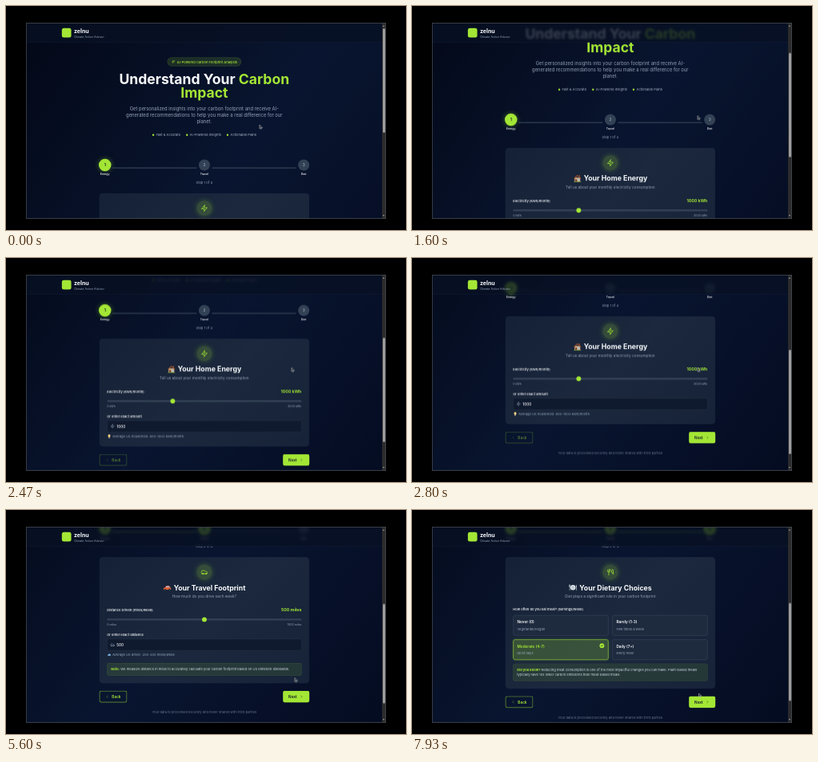
An HTML page that plays this animation: 500x281 px, repeating every 8 s.

```html
<!DOCTYPE html>
<html lang="en">
<head>
<meta charset="utf-8">
<title>Carbon footprint wizard</title>
<style>
:root { --lime: #a3e635; --mute: #94a3b8; --line: #334155; }
* { box-sizing: border-box; margin: 0; padding: 0; }
html, body { width: 100%; height: 100%; overflow: hidden; background: #000; }
body { font-family: Inter, sans-serif; color: #f8fafc; }
#stage { position: relative; width: 500px; height: 281px; overflow: hidden; background: #000; }
#win { position: absolute; left: 25px; top: 21px; width: 450px; height: 246px; overflow: hidden; background: #040a1b; }
#edge { position: absolute; inset: 0; box-shadow: inset 0 0 0 .7px #4a4d54; }
#view { position: absolute; left: 0; top: .5px; width: 1521px; height: 840px; transform: scale(.29297); transform-origin: 0 0; overflow: hidden; }
#page { position: absolute; left: 0; top: 0; width: 1521px; height: 1580px; background: linear-gradient(125deg, #030817, #091530 50%, #040b20); }
#main { position: absolute; left: 312.5px; top: 0; width: 896px; }
#page, #thumb, #cursor, #tail, #next, #back, .step, .count span, .dot, .bar i, #arrow, #hand { animation: 8s linear infinite; }
svg { display: block; fill: none; stroke: currentColor; stroke-width: 2; stroke-linecap: round; stroke-linejoin: round; }

header { position: absolute; left: 0; top: 0; width: 1521px; height: 81px; background: rgba(8,17,36,.8); backdrop-filter: blur(6px); border-bottom: 1px solid #1c2942; }
.logo { position: absolute; left: 152.5px; top: 20px; width: 40px; height: 40px; border-radius: 8px; background: var(--lime); }
.brand { position: absolute; left: 204.5px; top: 16px; font: 700 24px/32px Inter, sans-serif; }
.brand small { display: block; font: 400 12px/16px Inter, sans-serif; color: var(--mute); }

.mid { position: absolute; left: 0; width: 100%; text-align: center; white-space: nowrap; }
.badge { top: 145px; }
.badge span { display: inline-flex; align-items: center; gap: 8px; height: 38px; padding: 0 16px; border: 1px solid rgba(163,230,53,.3); border-radius: 19px; background: rgba(163,230,53,.14); color: var(--lime); font: 500 14px/20px Inter, sans-serif; }
h1 { top: 207px; font: 700 60px/60px Inter, sans-serif; }
h1 b, .val, .note b { color: var(--lime); }
.lead { top: 351px; font-size: 20px; line-height: 28px; color: var(--mute); }
.perks { top: 467px; display: flex; justify-content: center; gap: 24px; font-size: 14px; line-height: 20px; color: #a5b1c3; }
.perks span::before { content: ""; display: inline-block; width: 8px; height: 8px; margin-right: 8px; border-radius: 50%; background: var(--lime); vertical-align: 1px; }

.dot { position: absolute; top: 582px; width: 48px; height: 48px; border-radius: 50%; background: var(--line); color: var(--mute); font: 600 16px/48px Inter, sans-serif; text-align: center; }
.cap { position: absolute; top: 638px; width: 48px; text-align: center; font: 500 12px/16px Inter, sans-serif; }
.bar { position: absolute; top: 616px; width: 360px; height: 4px; border-radius: 2px; background: var(--line); overflow: hidden; }
.bar i { display: block; height: 4px; background: var(--lime); transform-origin: 0 0; }
.count { top: 672px; height: 20px; font-size: 14px; line-height: 20px; color: var(--mute); }
.count span { position: absolute; left: 0; width: 100%; animation-timing-function: step-end; }

.step { position: absolute; top: 726px; left: 0; width: 896px; padding: 32px; border: 1px solid #26344c; border-radius: 16px; background: linear-gradient(135deg, #152136, #1b283d 50%, #162338); }
.orb { width: 64px; height: 64px; margin: 0 auto 16px; padding: 16px; border-radius: 50%; background: rgba(163,230,53,.2); box-shadow: 0 0 20px rgba(163,230,53,.3); color: var(--lime); }
h2 { display: flex; justify-content: center; gap: 9px; font: 700 30px/36px Inter, sans-serif; white-space: nowrap; }
h2 svg { width: 37px; height: 36px; stroke: none; }
.sub { margin: 8px 0 32px; text-align: center; font-size: 16px; line-height: 24px; color: var(--mute); }
.row { display: flex; justify-content: space-between; align-items: center; height: 28px; font: 500 14px/20px Inter, sans-serif; }
.val { font-size: 18px; font-weight: 700; }
.track { position: relative; height: 8px; margin-top: 23px; border-radius: 4px; background: var(--line); }
.track i { position: absolute; top: -6px; width: 20px; height: 20px; margin-left: -10px; border-radius: 50%; background: var(--lime); }
.ends { display: flex; justify-content: space-between; margin: 9px 0 26px; font-size: 12px; line-height: 16px; color: var(--mute); }
.lab { font: 500 14px/20px Inter, sans-serif; }
.field { position: relative; height: 50px; margin: 8px 0 9px; padding-left: 40px; border: 1px solid var(--line); border-radius: 8px; background: #101a2e; font: 500 16px/48px Inter, sans-serif; }
.field svg { position: absolute; left: 12px; top: 14px; width: 20px; height: 20px; color: var(--mute); }
.hint { display: flex; gap: 5px; font-size: 14px; line-height: 20px; color: var(--mute); white-space: nowrap; }
.hint svg { width: 18px; height: 18px; stroke: none; }
.note { padding: 16px; border: 1px solid rgba(163,230,53,.25); border-radius: 8px; background: rgba(163,230,53,.1); font-size: 14px; line-height: 20px; color: #cbd5e1; white-space: nowrap; }
.grid { display: grid; grid-template-columns: 407px 407px; gap: 16px; margin: 16px 0; }
.opt { position: relative; height: 88px; padding: 15px 16px; border: 2px solid #3a485d; border-radius: 8px; background: #1e2a3e; font: 600 16px/24px Inter, sans-serif; }
.opt small { display: block; margin-top: 8px; font: 400 14px/20px Inter, sans-serif; color: var(--mute); }
.opt.on { border-color: var(--lime); background: rgba(163,230,53,.22); color: var(--lime); box-shadow: 0 0 14px rgba(163,230,53,.2); }
.opt svg { position: absolute; right: 16px; top: 15px; width: 20px; height: 20px; padding: 4px; border-radius: 50%; background: var(--lime); color: #0f172a; stroke-width: 4; }

#tail { position: absolute; top: 1221px; left: 0; width: 100%; animation-name: drop; animation-timing-function: step-end; }
.btn { position: absolute; top: 0; height: 50px; display: flex; align-items: center; justify-content: center; gap: 12px; border-radius: 8px; font: 600 16px/24px Inter, sans-serif; }
.btn svg { width: 16px; height: 16px; }
#back { left: 0; width: 118px; border: 2px solid var(--lime); color: var(--lime); animation-name: enable; }
#next { right: 0; width: 113px; background: var(--lime); color: #0f172a; animation-name: hover; }
.priv { top: 82px; font-size: 14px; line-height: 20px; color: #64748b; }
footer { position: absolute; left: -312.5px; top: 166px; width: 1521px; height: 140px; padding-top: 32px; border-top: 1px solid #1b2840; background: rgba(4,9,24,.4); text-align: center; font-size: 14px; line-height: 20px; color: var(--mute); }

#rail { position: absolute; left: 445px; top: 0; width: 5px; height: 246px; background: #2b2b2d; }
#rail::before, #rail::after { content: ""; position: absolute; left: 1.2px; border: 1.3px solid transparent; }
#rail::before { top: 2px; border-bottom: 2px solid #a0a0a0; }
#rail::after { bottom: 2px; border-top: 2px solid #a0a0a0; }
#thumb { position: absolute; left: 1px; width: 3px; top: 7px; border-radius: 1.5px; background: #9c9c9e; animation-name: thumb; }
#cursor { position: absolute; left: 0; top: 0; width: 6px; height: 7px; animation-name: point; }
#cursor svg { position: absolute; left: 0; top: 0; width: 6px; height: 7px; stroke: #e5e7eb; stroke-width: .5; fill: #111; animation-timing-function: step-end; }
#arrow { animation-name: arrow; }
#cursor #hand { fill: #f1f5f9; stroke: #1e293b; animation-name: hand; }

#page { animation-name: scroll; }
@keyframes scroll {
  0%, 12.5% { transform: none; }
  20% { transform: translateY(-194px); }
  24.125% { transform: translateY(-299px); }
  35% { transform: translateY(-552px); animation-timing-function: ease-out; }
  38.5%, 100% { transform: translateY(-600px); }
}
@keyframes thumb {
  0%, 12.5% { transform: none; height: 131px; }
  20% { transform: translateY(30.6px); }
  24.125% { transform: translateY(47.1px); }
  35% { transform: translateY(87px); animation-timing-function: ease-out; }
  38.5%, 61.62% { transform: translateY(94.6px); height: 131px; }
  61.63%, 94.62% { transform: translateY(89.6px); height: 125px; }
  94.63%, 100% { transform: translateY(88.5px); height: 123px; }
}
@keyframes point {
  0%, .9% { transform: translate(316.5px, 149px); animation-timing-function: ease-in-out; }
  5%, 45% { transform: translate(356.5px, 137.5px); animation-timing-function: ease-in-out; }
  51%, 73.4% { transform: translate(360.5px, 210.5px); animation-timing-function: ease-in-out; }
  83%, 100% { transform: translate(358px, 229.5px); }
}
@keyframes arrow { 0% { opacity: 1; } 50% { opacity: 0; } 61.63% { opacity: 1; } 81% { opacity: 0; } 94.63%, 100% { opacity: 1; } }
@keyframes hand { 0% { opacity: 0; } 50% { opacity: 1; } 61.63% { opacity: 0; } 81% { opacity: 1; } 94.63%, 100% { opacity: 0; } }
@keyframes hover {
  0%, 49.5% { background: #a3e635; } 51.5%, 61.62% { background: #84cc16; }
  63.5%, 80.5% { background: #a3e635; } 82.4%, 94.62% { background: #84cc16; } 96.5%, 100% { background: #a3e635; }
}
@keyframes enable { 0%, 57.5% { opacity: .5; } 61%, 100% { opacity: 1; } }
@keyframes drop { 0% { transform: none; } 61.63% { transform: translateY(78px); } 94.63%, 100% { transform: translateY(101px); } }
@keyframes s1 { 0%, 57.5% { opacity: 1; transform: none; } 61.62%, 100% { opacity: 0; transform: translateX(-20px); } }
@keyframes s2 {
  0%, 61.62% { opacity: 0; transform: translateX(20px); } 65.6%, 90.6% { opacity: 1; transform: none; }
  94.62%, 100% { opacity: 0; transform: translateX(-20px); }
}
@keyframes s3 { 0%, 94.62% { opacity: 0; transform: translateX(20px); } 98.5%, 100% { opacity: 1; transform: none; } }
@keyframes n1 { 0% { opacity: 1; } 57.5%, 100% { opacity: 0; } }
@keyframes n2 { 0% { opacity: 0; } 57.5% { opacity: 1; } 90.6%, 100% { opacity: 0; } }
@keyframes n3 { 0% { opacity: 0; } 90.6%, 100% { opacity: 1; } }
.lit { background: var(--lime); color: #0f172a; box-shadow: 0 0 20px rgba(163,230,53,.4); }
@keyframes d1 { 0%, 57.5% { transform: scale(1.1); } 61.2%, 100% { transform: none; } }
@keyframes d2 {
  0%, 57.5% { background: #334155; color: #94a3b8; transform: none; box-shadow: 0 0 20px transparent; }
  61.2%, 90.6% { background: #a3e635; color: #0f172a; transform: scale(1.1); box-shadow: 0 0 20px rgba(163,230,53,.4); }
  94.3%, 100% { background: #a3e635; color: #0f172a; transform: none; box-shadow: 0 0 20px rgba(163,230,53,.4); }
}
@keyframes d3 {
  0%, 90.6% { background: #334155; color: #94a3b8; transform: none; box-shadow: 0 0 20px transparent; }
  94.3%, 100% { background: #a3e635; color: #0f172a; transform: scale(1.1); box-shadow: 0 0 20px rgba(163,230,53,.4); }
}
@keyframes b1 { 0%, 57.5% { transform: scaleX(0); } 61.2%, 100% { transform: none; } }
@keyframes b2 { 0%, 90.6% { transform: scaleX(0); } 94.3%, 100% { transform: none; } }
</style>
</head>
<body>
<svg width="0" height="0" style="position:absolute">
  <symbol id="zap" viewBox="0 0 24 24"><path d="M13 2 3 14h9l-1 8 10-12h-9z"/></symbol>
  <symbol id="car" viewBox="0 0 24 24"><path d="M19 17h2c.6 0 1-.4 1-1v-3c0-.9-.7-1.7-1.5-1.9C18.7 10.6 16 10 16 10s-1.3-1.4-2.2-2.3c-.5-.4-1.1-.7-1.8-.7H5c-.6 0-1.1.4-1.4.9l-1.4 2.9A3.7 3.7 0 0 0 2 12v4c0 .6.4 1 1 1h2M9 17h6"/><circle cx="7" cy="17" r="2"/><circle cx="17" cy="17" r="2"/></symbol>
  <symbol id="fork" viewBox="0 0 24 24"><path d="M3 2v7c0 1.1.9 2 2 2h4a2 2 0 0 0 2-2V2M7 2v20M21 15V2a5 5 0 0 0-5 5v6c0 1.1.9 2 2 2h3zv7"/></symbol>
  <symbol id="star" viewBox="0 0 24 24"><path d="M11 4l2 6 6 2-6 2-2 6-2-6-6-2 6-2zM20 2v4M18 4h4"/></symbol>
  <symbol id="left" viewBox="0 0 24 24"><path d="m15 18-6-6 6-6"/></symbol>
  <symbol id="right" viewBox="0 0 24 24"><path d="m9 18 6-6-6-6"/></symbol>
  <symbol id="tick" viewBox="0 0 24 24"><path d="M4 12l6 6L20 6"/></symbol>
  <symbol id="house" viewBox="0 0 36 36"><path fill="#d9b38c" d="M6 15h24v18H6z"/><path fill="#a0522d" d="M18 3 2 18l3 2L18 8l13 12 3-2zM25 4h4v8l-4-4z"/><path fill="#6b3a22" d="M9 22h7v11H9z"/><path fill="#8ec5ea" d="M20 20h7v7h-7z"/><path fill="#5c913b" d="M2 31h32v3H2z"/></symbol>
  <symbol id="auto" viewBox="0 0 36 36"><path fill="currentColor" d="M2 20l7-3 5-7h12l6 8 2 3v6H2z"/><path fill="#9fd3f5" d="M12 17l4-5h4v5zM22 12h3l4 5h-7z"/><g fill="#30363d"><circle cx="9" cy="27" r="4"/><circle cx="27" cy="27" r="4"/></g></symbol>
  <symbol id="plate" viewBox="0 0 36 36"><circle cx="18" cy="18" r="11" fill="#e1e8ed"/><circle cx="18" cy="18" r="7" fill="#bcc8d2"/><path fill="#cbd5de" d="M2 5h1v7h1V5h1v7h1V5h1v9l-2 2v15H3V16l-2-2V5zM31 5q4 3 3 13h-1v13h-2z"/></symbol>
  <symbol id="bulb" viewBox="0 0 36 36"><path fill="#ffd983" d="M18 2a11 11 0 0 1 7 19l-2 6H13l-2-6A11 11 0 0 1 18 2z"/><path fill="#99aab5" d="M13 28h10v4l-3 3h-4l-3-3z"/></symbol>
</svg>
<div id="stage">
  <div id="win">
    <div id="view">
      <div id="page"><div id="main">
        <div class="mid badge"><span><svg width="16" height="16"><use href="#star"/></svg>AI-Powered Carbon Footprint Analysis</span></div>
        <h1 class="mid">Understand Your <b>Carbon<br>Impact</b></h1>
        <p class="mid lead">Get personalized insights into your carbon footprint and receive AI-<br>generated recommendations to help you make a real difference for our<br>planet.</p>
        <div class="mid perks"><span>Fast &amp; Accurate</span><span>AI-Powered Insights</span><span>Actionable Plans</span></div>

        <div class="bar" style="left:56px"><i style="animation-name:b1"></i></div>
        <div class="bar" style="left:480px"><i style="animation-name:b2"></i></div>
        <div class="dot lit" style="left:0;animation-name:d1">1</div>
        <div class="dot" style="left:424px;animation-name:d2">2</div>
        <div class="dot" style="left:848px;animation-name:d3">3</div>
        <div class="cap" style="left:0">Energy</div>
        <div class="cap" style="left:424px">Travel</div>
        <div class="cap" style="left:848px">Diet</div>
        <div class="mid count">
          <span style="animation-name:n1">Step 1 of 4</span><span style="animation-name:n2">Step 2 of 4</span><span style="animation-name:n3">Step 3 of 4</span>
        </div>

        <section class="step" style="height:463px;animation-name:s1">
          <svg class="orb"><use href="#zap"/></svg>
          <h2><svg><use href="#house"/></svg>Your Home Energy</h2>
          <p class="sub">Tell us about your monthly electricity consumption</p>
          <div class="row"><span>Electricity (kWh/month)</span><span class="val">1000 kWh</span></div>
          <div class="track"><i style="left:280px"></i></div>
          <div class="ends"><span>0 kWh</span><span>3000 kWh</span></div>
          <div class="lab">Or enter exact amount</div>
          <div class="field"><svg><use href="#zap"/></svg>1000</div>
          <div class="hint"><svg><use href="#bulb"/></svg>Average US household: 800-1000 kWh/month</div>
        </section>

        <section class="step" style="height:541px;animation-name:s2">
          <svg class="orb"><use href="#car"/></svg>
          <h2><svg style="color:#e0603a"><use href="#auto"/></svg>Your Travel Footprint</h2>
          <p class="sub">How much do you drive each week?</p>
          <div class="row"><span>Distance Driven (miles/week)</span><span class="val">500 miles</span></div>
          <div class="track"><i style="left:415px"></i></div>
          <div class="ends"><span>0 miles</span><span>1000 miles</span></div>
          <div class="lab">Or enter exact distance</div>
          <div class="field"><svg><use href="#car"/></svg>500</div>
          <div class="hint"><svg style="color:#6b9fd0"><use href="#auto"/></svg>Average US driver: 200-300 miles/week</div>
          <div class="note" style="margin-top:24px"><b>Note:</b> We measure distance in miles to accurately calculate your carbon footprint based on US emission standards.</div>
        </section>

        <section class="step" style="height:564px;animation-name:s3">
          <svg class="orb"><use href="#fork"/></svg>
          <h2><svg><use href="#plate"/></svg>Your Dietary Choices</h2>
          <p class="sub">Diet plays a significant role in your carbon footprint</p>
          <div class="lab">How often do you eat meat? (servings/week)</div>
          <div class="grid">
            <div class="opt">Never (0)<small>Vegetarian/Vegan</small></div>
            <div class="opt">Rarely (1-3)<small>Few times a week</small></div>
            <div class="opt on">Moderate (4-7)<small>Most days</small><svg><use href="#tick"/></svg></div>
            <div class="opt">Daily (7+)<small>Every meal</small></div>
          </div>
          <div class="note"><b>Did you know?</b> Reducing meat consumption is one of the most impactful changes you can make. Plant-based meals<br>typically have 10x lower carbon emissions than meat-based meals.</div>
        </section>

        <div id="tail">
          <div class="btn" id="back"><svg><use href="#left"/></svg>Back</div>
          <div class="btn" id="next">Next<svg><use href="#right"/></svg></div>
          <p class="mid priv">Your data is processed securely and never shared with third parties</p>
          <footer>Built for Orbelquartz DevAI Buildathon 2025</footer>
        </div>
      </div></div>
      <header><div class="logo"></div><div class="brand">zelnu<small>Climate Action Advisor</small></div></header>
    </div>
    <div id="rail"><div id="thumb"></div></div>
    <div id="edge"></div>
  </div>
  <div id="cursor">
    <svg id="arrow" viewBox="0 0 6 7"><path d="M.5.5v4.2l1-.9.7 1.6.7-.3-.7-1.5h1.3z"/></svg>
    <svg id="hand" viewBox="0 0 6 7"><path d="M1.5.8q.5-.5.9 0v1.7l1.8.5q.5.2.4.7l-.3 1.8H2L.6 3.6q.2-.6.9 0z"/></svg>
  </div>
</div>
</body>
</html>
```
